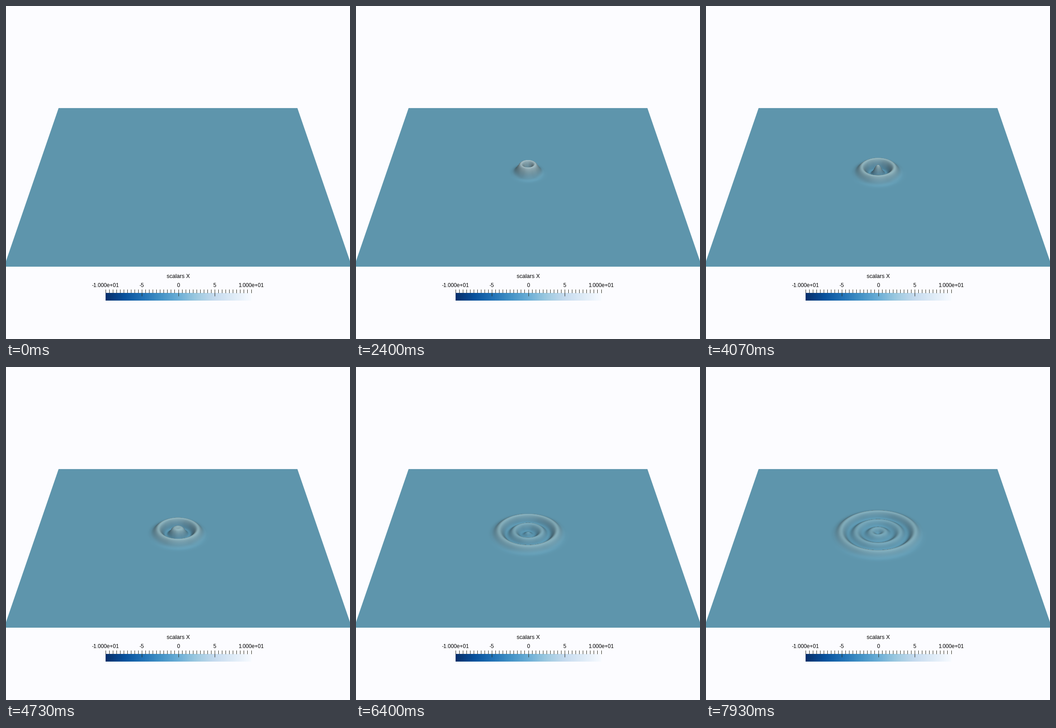
Write a matplotlib script that moves like this. It is 760 px wide and 737 px high and loops after 8000 ms.

```python
import numpy as np
import matplotlib.pyplot as plt
from matplotlib.animation import FuncAnimation

W, H, DPI = 760, 737, 64
FRAMES, INTERVAL = 125, 64
PX = 72 / DPI                      # points per pixel
CMAP = plt.cm.Blues_r

# Camera: looks at the plane centre, one world unit = one pixel there
CX, CY, DIST = 380, 368.8, 1415
PITCH = np.radians(32.8)
SIN, COS = np.sin(PITCH), np.cos(PITCH)
HALF = 312.8                       # half side of the square plane
UNIT = HALF / 50                   # pixels per scalar unit

# Wave: gaussian source with a fading sine drive, radial wave equation
SPEED, PERIOD, SIGMA, FADE = 0.79, 41, 6.5, 84
DR, STEP, SUB = 0.5, 0.96, 4
R = np.arange(0, 220, DR)


def light(azimuth, elevation, strength, color):
    a, e = np.radians([azimuth, elevation])
    way = np.array([np.sin(a) * np.cos(e), np.sin(e), np.cos(a) * np.cos(e)])
    return way, strength * np.array(color)


LIGHTS = [
    light(10, 50, 0.75, (1, 0.972, 0.902)),
    light(0, -75, 0.25, (0.9, 0.95, 1)),
    light(0, 0, 0.25, (1, 1, 1)),
    light(110, 0, 0.214, (1, 1, 1)),
    light(-110, 0, 0.214, (1, 1, 1)),
]


def simulate():
    dt = STEP / SUB
    source = np.exp(-R**2 / (2 * SIGMA**2))
    now, old = np.zeros_like(R), np.zeros_like(R)
    states = [now]
    for n in range((FRAMES - 1) * SUB):
        t = n * dt
        lap = np.zeros_like(R)
        lap[1:-1] = ((now[2:] - 2 * now[1:-1] + now[:-2]) / DR**2
                     + (now[2:] - now[:-2]) / (2 * DR * R[1:-1]))
        lap[0] = 4 * (now[1] - now[0]) / DR**2
        drive = np.sin(2 * np.pi * t / PERIOD) * np.exp(-t / FADE)
        new = 2 * now - old + dt**2 * (SPEED**2 * lap + drive * source)
        new[-1] = 0
        old, now = now, new
        if (n + 1) % SUB == 0:
            states.append(now)
    states = np.array(states)
    return states * 42 / states[25, 0]


def shade(height, nx, nv, nh):
    """Lit colour of surface points with normal (right, away, up)."""
    normal = np.stack([nx, nv * SIN + nh * COS, nh * SIN - nv * COS], -1)
    lit = sum(np.maximum(normal @ way, 0)[:, None] * color
              for way, color in LIGHTS)
    base = CMAP(0.5 + height / UNIT / 20)[:, :3]
    return np.round(255 * np.clip(base * lit, 0, 1)).astype(np.uint8)


def project(u, v):
    z = DIST + v * COS
    return CX + DIST * u / z, CY - DIST * v * SIN / z


WAVES = simulate()
FLAT = shade(np.zeros(1), np.zeros(1), np.zeros(1), np.ones(1))[0]

# Each pixel's ray as a line in height h: u = U0 + h*DU, v = V0 + h*DV
X0, X1, Y0, Y1 = 245, 515, 295, 447
xs, ys = np.meshgrid(np.arange(X0, X1) + 0.5, np.arange(Y0, Y1) + 0.5)
A, B = (xs - CX) / DIST, (CY - ys) / DIST
DV = -(COS + B * SIN) / (SIN - B * COS)
V0 = B * DIST / (SIN - B * COS)
DU = A * (DV * COS - SIN)
U0 = A * (DIST + V0 * COS)
R0 = np.hypot(U0, V0)


def render(i):
    wave = WAVES[i]
    image = np.empty(xs.shape + (3,), np.uint8)
    image[:] = FLAT
    near = R0 < SPEED * STEP * i + 60
    u0, v0, du, dv = U0[near], V0[near], DU[near], DV[near]

    # walk each ray down through height levels to its first hit
    levels = np.linspace(wave.max() + 0.01, wave.min() - 0.01, 26)
    col = levels[:, None]
    gap = np.interp(np.hypot(u0 + col * du, v0 + col * dv), R, wave) - col
    hit = np.maximum(np.argmax(gap >= 0, axis=0), 1)
    k = np.arange(hit.size)
    above, below = gap[hit - 1, k], gap[hit, k]
    part = above / (above - below)
    h = levels[hit - 1] + part * (levels[hit] - levels[hit - 1])

    u, v = u0 + h * du, v0 + h * dv
    r = np.maximum(np.hypot(u, v), 1e-6)
    slope = np.interp(r, R, np.gradient(wave, DR))
    size = np.sqrt(1 + slope**2)
    image[near] = shade(h, -slope * u / r / size, -slope * v / r / size,
                        1 / size)
    return image


fig = plt.figure(figsize=(W / DPI, H / DPI), dpi=DPI, facecolor="#fcfcff")
ax = fig.add_axes([0, 0, 1, 1])

corners = [project(u * HALF, v * HALF)
           for u, v in ((-1, 1), (1, 1), (1, -1), (-1, -1))]
ax.add_patch(plt.Polygon(corners, facecolor=FLAT / 255, edgecolor="none"))
surface = ax.imshow(render(0), extent=(X0, X1, Y1, Y0), aspect="auto",
                    interpolation="nearest", zorder=2)

# Colour bar
LEFT, RIGHT, TOP, BOTTOM = 220, 542, 635, 652
ramp = CMAP(np.linspace(0, 1, RIGHT - LEFT))[None, :, :3]
ax.imshow(ramp, extent=(LEFT, RIGHT, BOTTOM, TOP), aspect="auto",
          interpolation="nearest", zorder=2)
for n in range(41):
    x = int(LEFT - 1 + n * (RIGHT - LEFT) / 40) + 0.5
    end = 642 if n in (10, 20, 30) else TOP
    ax.plot([x, x], [627, end], color="#2a2a1c", lw=PX, zorder=3,
            solid_capstyle="butt")


def label(x, y, text, size=11.8):
    ax.text(x, y, text, family="Liberation Sans", size=size * PX,
            color="black", ha="center", va="baseline", zorder=3)


label(381, 602, "scalars X", 12.4)
for n, text in enumerate(("-1.000e+01", "-5", "0", "5", "1.000e+01")):
    label(219.3 + n * 80.6, 622, text)

ax.set_xlim(0, W)
ax.set_ylim(H, 0)
ax.axis("off")


def update(i):
    surface.set_data(render(i))
    return [surface]


anim = FuncAnimation(fig, update, frames=FRAMES, interval=INTERVAL,
                     repeat=True, repeat_delay=0, blit=False)
plt.show()
```
